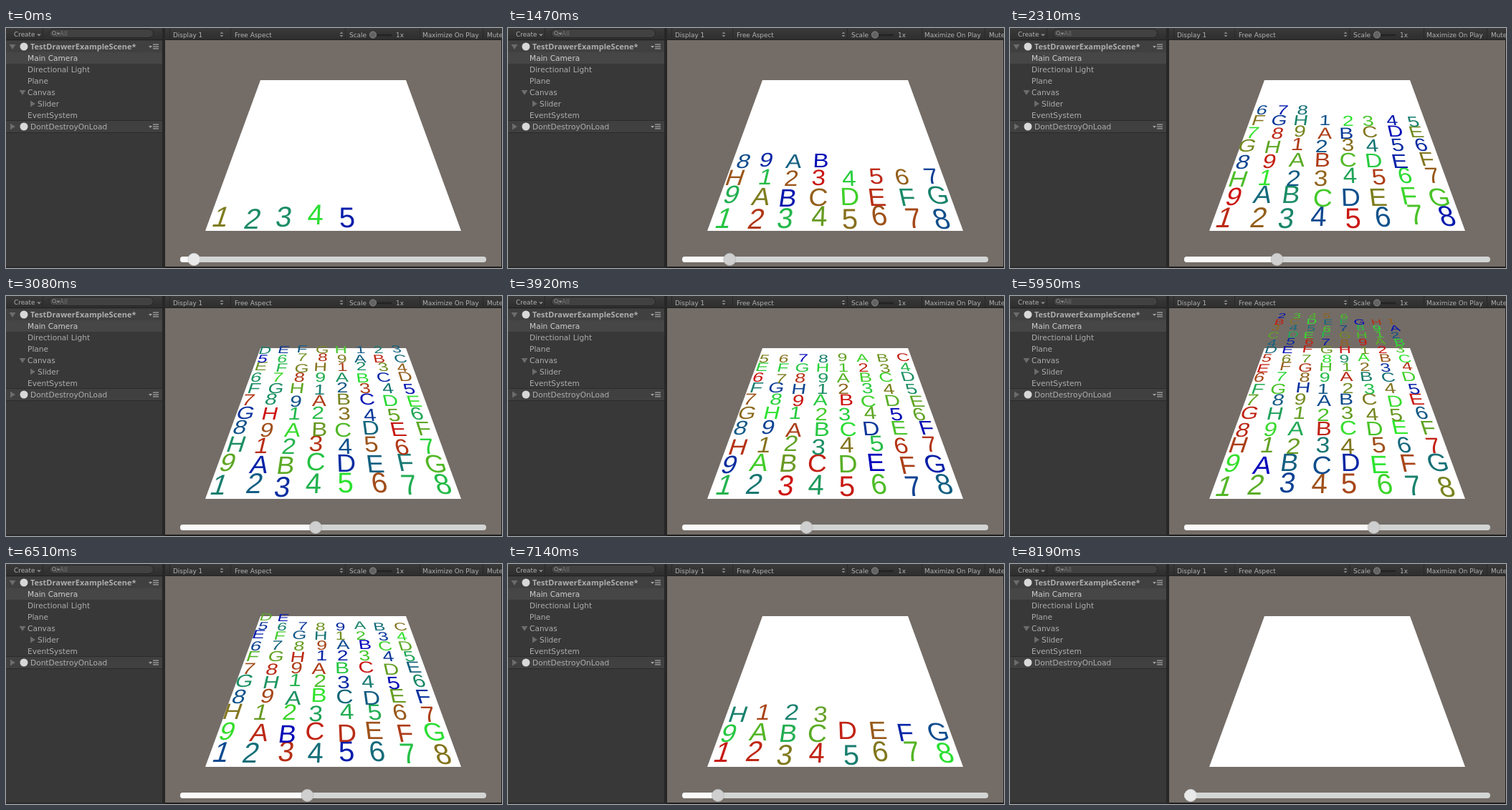
Recreate the animation shown at these times as an HTML page with a canvas. Size 692 by 336 pixels, loop 8260 ms.

```html
<!DOCTYPE html>
<html lang="en">
<head>
<meta charset="utf-8">
<title>Drawer scene</title>
<style>
  html, body { margin: 0; width: 100%; height: 100%; overflow: hidden; background: #383838; }
  svg, canvas { position: absolute; left: 0; top: 0; width: 692px; height: 336px; }
  text { font-family: "DejaVu Sans", sans-serif; white-space: pre; }
  .bar text { font-size: 8.9px; fill: #b2b2b2; }
  .tree text { font-size: 10.6px; fill: #adadad; }
  .tree .scene { font: 700 11px "Noto Sans", sans-serif; }
  .tree .on { fill: #cfcfcf; }
</style>
</head>
<body>
<svg viewBox="0 0 692 336">
  <defs>
    <linearGradient id="top" x2="0" y2="1">
      <stop stop-color="#3a3a3a"/><stop offset="1" stop-color="#2e2e2e"/>
    </linearGradient>
    <path id="open" d="M-4.5-3h9L0 4z" fill="#6c6c6c"/>
    <path id="shut" d="M-3-4.5v9L4 0z" fill="#6c6c6c"/>
    <path id="updown" d="M-2.5-1L0-3.5 2.5-1zM-2.5 1L0 3.5 2.5 1z" fill="#8c8c8c"/>
    <g id="menu" fill="#a4a4a4">
      <path d="M-7-1h5l-2.5 3zM-1-3.5h8v1.3h-8zM-1-.6h8v1.3h-8zM-1 2.3h8v1.3h-8z"/>
    </g>
  </defs>

  <rect width="692" height="336" fill="#383838"/>
  <rect x="222" y="17" width="469" height="317" fill="#746d67"/>
  <path d="M355 73H558L635 284H278z" fill="#fff"/>

  <g class="bar">
    <rect width="692" height="16" fill="url(#top)"/>
    <path d="M0 16.5H692" stroke="#222"/>
    <path d="M51.5 0V16M228.5 0V16M313.5 0V16M473.5 0V16M577.5 0V16M665.5 0V16" stroke="#292929"/>
    <text x="11" y="12">Create</text>
    <path d="M43 8.500h6l-3 3z" fill="#8c8c8c"/>
    <rect x="60.500" y="1.500" width="145" height="12" rx="6" fill="#414141" stroke="#252525"/>
    <circle cx="67" cy="7" r="2.500" fill="none" stroke="#8a8a8a"/>
    <path d="M69 9l2.500 2.500M71 7h4l-2 2.500z" stroke="#8a8a8a" stroke-width=".8" fill="#8a8a8a"/>
    <text x="75" y="11" style="fill:#747474">All</text>
    <text x="233" y="12.500">Display 1</text>
    <text x="319" y="12.500">Free Aspect</text>
    <text x="479" y="12.500">Scale</text>
    <text x="544" y="12.500">1x</text>
    <text x="581" y="12.500">Maximize On Play</text>
    <text x="671" y="12.500">Mute Audio</text>
    <use href="#updown" x="301" y="9"/>
    <use href="#updown" x="468" y="9"/>
    <path d="M508 10H538" stroke="#232323" stroke-width="2.500"/>
    <circle cx="512" cy="9.500" r="4.500" fill="#636363" stroke="#8a8a8a"/>
  </g>

  <g class="tree">
    <path d="M0 18H218V34H0zM0 130H218V146H0z" fill="#404040"/>
    <path d="M0 34H218V50H0z" fill="#464646"/>
    <path d="M0 146.500H218M0 129.500H218" stroke="#2b2b2b"/>
    <use href="#open" x="9" y="26"/>
    <use href="#open" x="23" y="90"/>
    <use href="#shut" x="37" y="106"/>
    <use href="#shut" x="9" y="138"/>
    <circle cx="25" cy="26" r="5.500" fill="#d8d8d8"/>
    <circle cx="25" cy="138" r="5.500" fill="#d8d8d8"/>
    <use href="#menu" x="206" y="26"/>
    <use href="#menu" x="206" y="138"/>
    <text class="scene" x="34" y="30">TestDrawerExampleScene*</text>
    <text class="on" x="30" y="46">Main Camera</text>
    <text x="30" y="62">Directional Light</text>
    <text x="30" y="78">Plane</text>
    <text x="30" y="94">Canvas</text>
    <text x="44" y="110">Slider</text>
    <text x="30" y="126">EventSystem</text>
    <text x="34" y="142">DontDestroyOnLoad</text>
  </g>

  <path d="M218 0h4V336h-4z" fill="#272727"/>
  <path d="M691 17h1V336h-1zM222 334H692V336H222z" fill="#1f1f1f"/>
  <path d="M0 334H218V336H0z" fill="#2a2a2a"/>
</svg>
<canvas id="stage" width="692" height="336"></canvas>

<script>
const ctx = document.getElementById('stage').getContext('2d');
const LOOP = 8260, STEP = 70, COLS = 8;
const GLYPHS = '123456789ABCDEFGH';
const HORIZON = -205, MID = 456.5, NEAR = 469;
const RAMP = [[205, 18, 18], [45, 232, 45], [0, 0, 188]];

// Dragged slider: time and number of glyphs
const DRAG = [[0, 5], [1470, 28], [3080, 88], [3500, 96], [5040, 11],
              [5950, 125], [7140, 20], [7980, 0], [LOOP, 0]];

const slope = i => (DRAG[i + 1][1] - DRAG[i][1]) / (DRAG[i + 1][0] - DRAG[i][0]);

// Harmonic mean keeps the curve from overshooting its points
function tangent(i) {
  if (i === 0) return slope(0);
  if (i === DRAG.length - 1) return 0;
  const a = slope(i - 1), b = slope(i);
  return a * b > 0 ? 2 * a * b / (a + b) : 0;
}

function amount(t) {
  let i = 0;
  while (i < DRAG.length - 2 && t >= DRAG[i + 1][0]) i++;
  const [t0, v0] = DRAG[i], [t1, v1] = DRAG[i + 1];
  const h = t1 - t0, u = (t - t0) / h, w = 1 - u;
  return v0 * (1 + 2 * u) * w * w + v1 * u * u * (3 - 2 * u)
       + h * u * w * (tangent(i) * w - tangent(i + 1) * u);
}

function randomizer(seed) {
  let s = Math.imul(seed + 1, 0x9e3779b1);
  return () => {
    s = s + 0x6d2b79f5 | 0;
    let x = Math.imul(s ^ s >>> 15, 1 | s);
    x = x + Math.imul(x ^ x >>> 7, 61 | x) ^ x;
    return ((x ^ x >>> 14) >>> 0) / 4294967296;
  };
}

function tint(k) {
  const i = k < 1 ? 0 : 1, f = k - i;
  return `rgb(${RAMP[i].map((v, c) => Math.round(v + (RAMP[i + 1][c] - v) * f))})`;
}

// Lay one glyph flat on the ground plane
function drawGlyph(i, rand) {
  const row = Math.floor(i / COLS), col = i % COLS;
  const depth = 1 / (0.002132 + 0.000144 * row);
  const s = depth / NEAR;
  const x = 454 + s * (43.8 * (col - 3.5) + 6 * (rand() - 0.5));
  const y = HORIZON + depth + s * s * 6.5 * (rand() - 0.5);
  const lean = (x - MID) / (y - HORIZON);
  ctx.setTransform(s, 0, s * s * lean, s * s, x, y);
  ctx.fillStyle = tint(2 * rand());
  ctx.fillText(GLYPHS[i % GLYPHS.length], 0, 14.3);
}

function pill(x, width, color) {
  ctx.fillStyle = color;
  ctx.beginPath();
  ctx.roundRect(x, 320, width, 8, 4);
  ctx.fill();
}

function drawSlider(n, held) {
  const x = 252 + 2.045 * n;
  pill(243, 427, '#d3d5d5');
  pill(243, x - 243, '#fafafa');
  ctx.beginPath();
  ctx.arc(x, 324, 8.5, 0, 2 * Math.PI);
  ctx.fillStyle = held ? '#cfcfcf' : '#e9e9e9';
  ctx.fill();
  ctx.strokeStyle = held ? '#b9b9b9' : '#d2d2d2';
  ctx.lineWidth = 0.8;
  ctx.stroke();
}

function draw(tick) {
  const t = tick * STEP, n = amount(t), rand = randomizer(tick);
  ctx.setTransform(1, 0, 0, 1, 0, 0);
  ctx.clearRect(0, 0, 692, 336);
  ctx.save();
  ctx.beginPath();
  ctx.rect(222, 17, 469, 317);
  ctx.clip();
  ctx.font = '40px "Liberation Sans", Arial, sans-serif';
  ctx.textAlign = 'center';
  for (let i = 0; i < Math.round(n); i++) drawGlyph(i, rand);
  ctx.restore();
  drawSlider(n, t > 300 && t < 7980);
}

let last = -1;
function play() {
  const tick = Math.floor(performance.now() % LOOP / STEP);
  if (tick !== last) draw(last = tick);
  requestAnimationFrame(play);
}
play();
</script>
</body>
</html>
```
